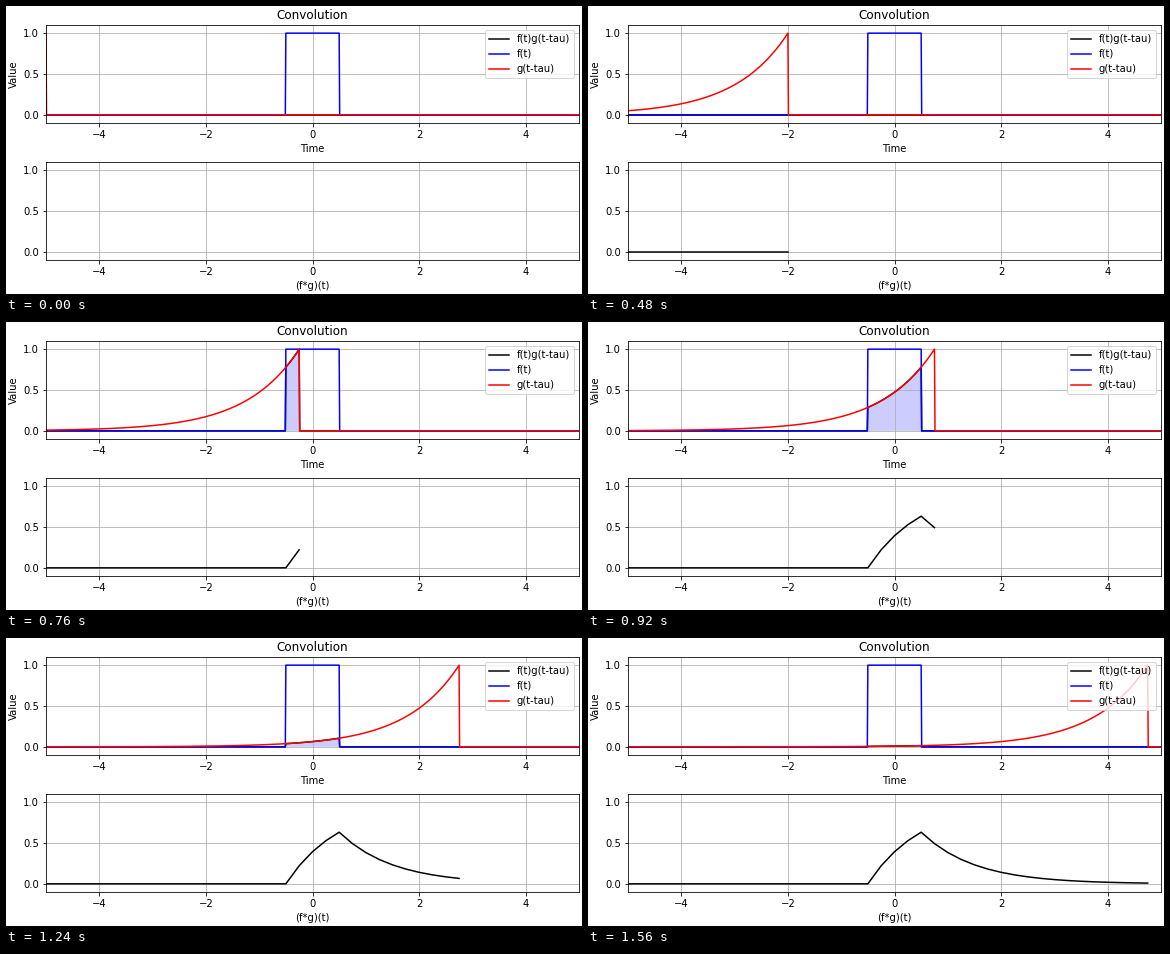
Recreate the animation shown at these times as a matplotlib script. Size 576 by 288 pixels, loop 1.6 s.

```python
import numpy as np
import matplotlib.pyplot as plt
from matplotlib.animation import FuncAnimation

W, H, DPI = 576, 288, 72
FRAMES, INTERVAL = 40, 40
LEFT, AX_W, AX_H = 40, 533, 98

plt.rcParams["font.family"] = "DejaVu Sans"

t = np.arange(-500, 501) / 100
taus = -5 + 0.25 * np.arange(FRAMES)
pulse = np.where(np.abs(t) <= 0.5, 1.0, 0.0)


def decay(x):
    """Causal exponential exp(-x) for x >= 0."""
    return np.where(x >= 0, np.exp(-np.maximum(x, 0)), 0.0)


def convolved(tau):
    """Closed form of the unit pulse convolved with the decay."""
    rise = np.maximum(tau + 0.5, 0)
    fall = np.maximum(tau - 0.5, 0)
    return np.exp(-fall) - np.exp(-rise)


def make_axes(top, xlabel):
    ax = fig.add_axes([LEFT / W, (H - top - AX_H) / H, AX_W / W, AX_H / H])
    ax.set(xlim=(-5, 5), ylim=(-0.1, 1.1), xlabel=xlabel,
           xticks=range(-4, 5, 2), yticks=[0, 0.5, 1])
    ax.grid(True)
    return ax


fig = plt.figure(figsize=(W / DPI, H / DPI), dpi=DPI, facecolor="white")
upper = make_axes(19, "Time")
lower = make_axes(156, "(f*g)(t)")
upper.set_title("Convolution")
upper.set_ylabel("Value")

product_line, = upper.plot([], [], "k", label="f(t)g(t-tau)")
upper.plot(t, pulse, "b", label="f(t)")
decay_line, = upper.plot([], [], "r", label="g(t-tau)")
result_line, = lower.plot([], [], "k")
upper.legend(loc="upper right")


def draw(i):
    shifted = decay(taus[i] - t)
    product = pulse * shifted
    product_line.set_data(t, product)
    decay_line.set_data(t, shifted)
    for area in list(upper.collections):
        area.remove()
    upper.fill_between(t, product, facecolor="b", alpha=0.2, linewidth=0)
    past = taus[:i + 1]
    result_line.set_data(past, convolved(past))
    return product_line, decay_line, result_line


anim = FuncAnimation(fig, draw, frames=FRAMES, interval=INTERVAL,
                     init_func=lambda: draw(0), repeat=True, repeat_delay=0)
plt.show()
```
